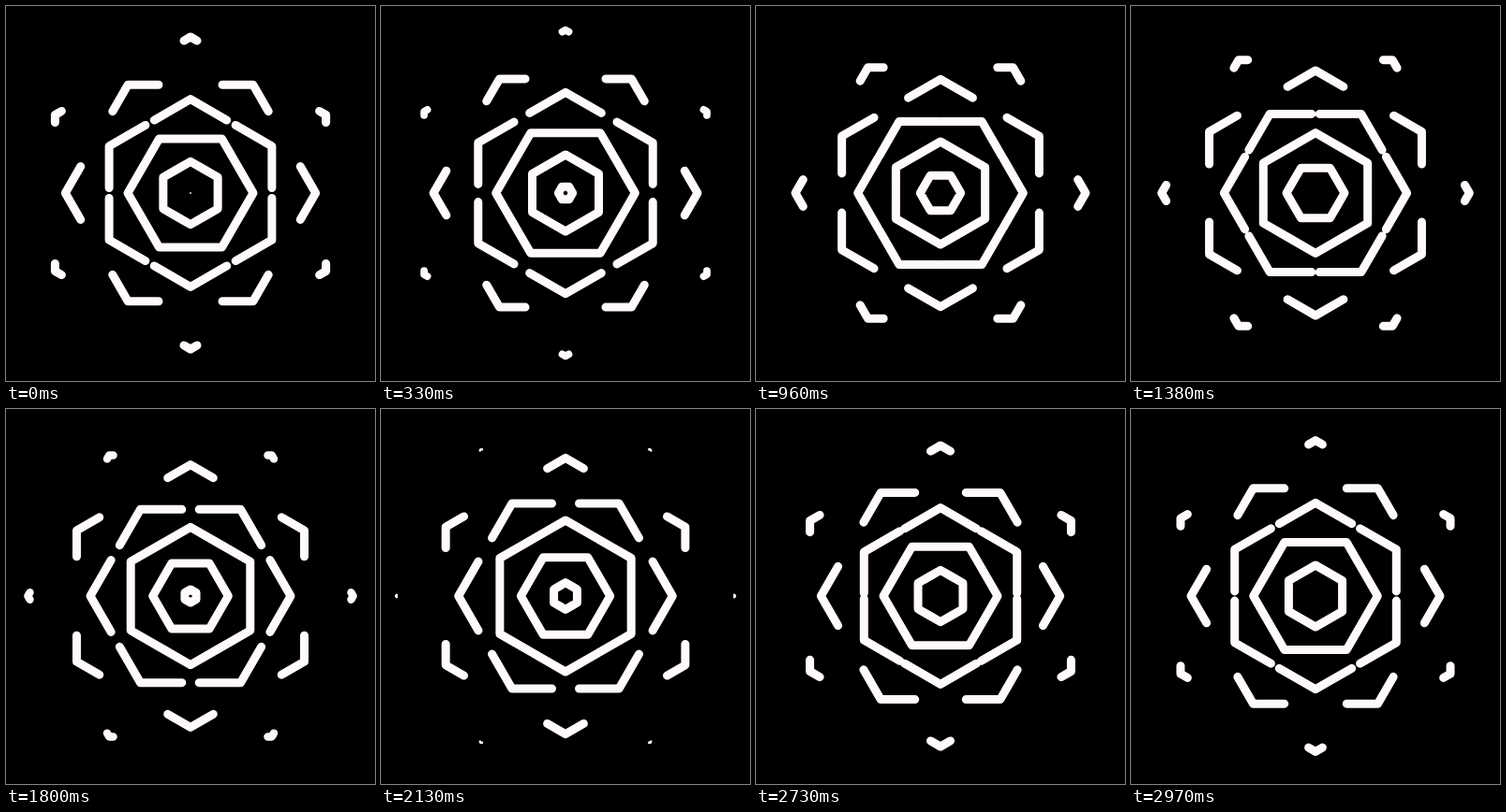
These frames come from a looping animation (394x401 px, 3 s). An HTML page with a canvas:

```html
<!DOCTYPE html>
<html lang="en">
<head>
<meta charset="utf-8">
<title>Hexagon ripple</title>
<style>
html, body { margin: 0; width: 100%; height: 100%; overflow: hidden; background: #000; }
canvas { display: block; }
</style>
</head>
<body>
<canvas id="stage" width="394" height="401"></canvas>
<script>
const ctx = document.getElementById('stage').getContext('2d');
const LOOP = 3000, STEP = 30, GAP = 100 / 3, CX = 197, CY = 200;
const clamp01 = x => Math.max(0, Math.min(1, x));
const mix = (a, b, u) => a + (b - a) * u;

// Share of each half side still drawn: full near the centre, none at the rim.
const armShare = r => (1 + Math.cos(Math.PI * clamp01((r - 76) / 114))) / 2;

function drawHexagon(r, turn) {
  const share = armShare(r);
  const halfWidth = Math.min(4.5, r, 85 * share);
  if (r <= 0 || halfWidth < 0.05) return;

  const corner = i => {
    const a = turn + i * Math.PI / 3;
    return [CX + r * Math.cos(a), CY + r * Math.sin(a)];
  };
  // End of the arm that leaves corner p towards corner q.
  const armEnd = (p, q) => [mix(p[0], q[0], share / 2), mix(p[1], q[1], share / 2)];

  ctx.lineWidth = 2 * halfWidth;
  ctx.beginPath();
  for (let i = 0; i < 6; i++) {
    const p = corner(i);
    ctx.moveTo(...armEnd(p, corner(i - 1)));
    ctx.lineTo(...p);
    ctx.lineTo(...armEnd(p, corner(i + 1)));
  }
  ctx.stroke();
}

function draw(now) {
  const time = Math.floor((now % LOOP) / STEP) * STEP + STEP / 2;
  ctx.fillStyle = '#000';
  ctx.fillRect(0, 0, 394, 401);
  ctx.strokeStyle = '#fffafa';
  ctx.lineCap = ctx.lineJoin = 'round';
  // Two rings are born per loop, flat and pointed in turn.
  for (let k = -1; k < 6; k++) {
    drawHexagon((k + 2 * time / LOOP) * GAP, k % 2 ? Math.PI / 6 : 0);
  }
}

function tick() {
  draw(performance.now());
  requestAnimationFrame(tick);
}
tick();
</script>
</body>
</html>
```
